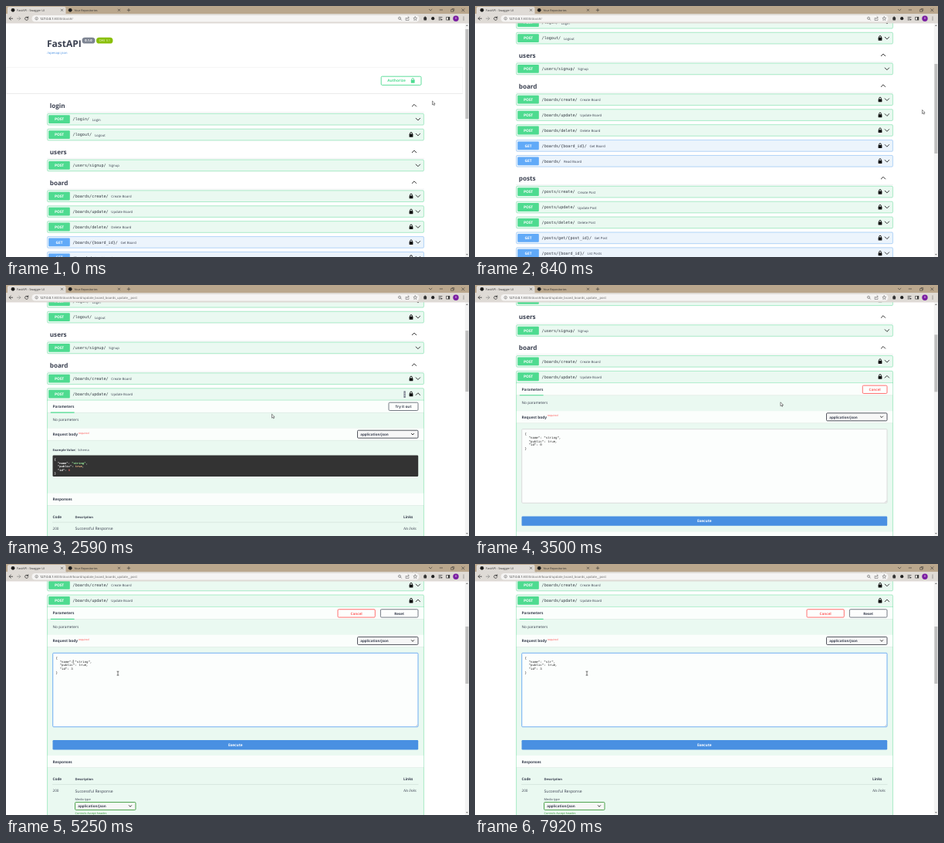
These frames come from a looping animation (600 by 325 pixels, 8000 ms). An HTML page:

```html
<!DOCTYPE html>
<html lang="en">
<head>
<meta charset="utf-8">
<title>API docs</title>
<style>
  html, body { margin: 0; width: 100%; height: 100%; overflow: hidden; background: #fff; }
  svg { display: block; width: 100vw; height: 100vh; }
  text { font-family: "Open Sans", "Noto Sans", sans-serif; white-space: pre; text-rendering: geometricPrecision; }
  .mono { font-family: "Liberation Mono", monospace; }
  .path { font-family: "DejaVu Sans Mono", monospace; }
  .b { font-weight: 700; }
  .i { font-style: italic; }
  .mid { text-anchor: middle; }
</style>
</head>
<body>
<svg id="stage" viewBox="0 0 600 325" preserveAspectRatio="none"></svg>
<script>
const LOOP = 8000, TICK = 1000 / 12, WHEEL = 31.25;
const GREEN = '#4edb90', BLUE = '#61aaf8', INK = '#3b4151', RED = '#ff6060', BAR = '#dfdbd6';
const stage = document.getElementById('stage');

function el(parent, tag, attrs = {}, text) {
  const node = document.createElementNS('http://www.w3.org/2000/svg', tag);
  for (const k in attrs) node.setAttribute(k, attrs[k]);
  if (text !== undefined) node.textContent = text;
  return parent.appendChild(node);
}
const group = parent => el(parent, 'g');
const rect = (p, x, y, width, height, fill, more) => el(p, 'rect', { x, y, width, height, fill, ...more });
const circle = (p, cx, cy, r, fill, more) => el(p, 'circle', { cx, cy, r, fill, ...more });
const line = (p, d, stroke, width = 0.8) =>
  el(p, 'path', { d, stroke, 'stroke-width': width, fill: 'none', 'stroke-linecap': 'round', 'stroke-linejoin': 'round' });
// text placed by the vertical middle of its capitals
const label = (p, x, cy, s, size, cls = '', fill = INK) =>
  el(p, 'text', { x, y: cy + size * 0.35, 'font-size': size, class: cls, fill }, s);
const show = (node, on) => node.setAttribute('display', on ? 'inline' : 'none');

function chevron(p, x, y, up, size = 2.7, color = '#222') {
  const h = up ? -size / 4 : size / 4;
  return line(p, `M${x - size} ${y - 2 * h}L${x} ${y + 2 * h}L${x + size} ${y - 2 * h}`, color, 0.9);
}
function lock(p, x, y, color) {
  rect(p, x - 2.4, y - 0.8, 4.8, 3.9, color, { rx: 0.5 });
  line(p, `M${x - 1.4} ${y - 0.6}v-1a1.4 1.4 0 0 1 2.8 0v1`, color, 0.9);
}
function button(p, x, y, w, h, s, color, textColor) {
  const g = group(p);
  rect(g, x, y, w, h, '#fff', { 'fill-opacity': 0.6, stroke: color, 'stroke-width': 0.9, rx: 1.3 });
  label(g, x + w / 2, y + h / 2, s, 4.6, 'b mid', textColor);
  return g;
}
function select(p, x, y, color) {
  rect(p, x, y, 78.5, 10, '#f7f7f7', { stroke: color, 'stroke-width': 0.9, rx: 1.2 });
  label(p, x + 3.7, y + 5.1, 'application/json', 4.5, 'b');
  chevron(p, x + 71.5, y + 5, false, 1.6);
}
function band(p, cy, s) {
  rect(p, 53.8, cy - 7.7, 487.4, 15.8, '#000', { 'fill-opacity': 0.07 });
  rect(p, 53.8, cy - 7.9, 487.4, 15.4, '#fbfefc');
  label(p, 60.5, cy, s, 4.8, 'b');
}

// ---------- page ----------
rect(stage, 0, 0, 600, 325, '#fff');
const page = group(stage);

label(page, 53, 48.3, 'FastAPI', 12, 'b');
rect(page, 98.5, 40.8, 17, 7.8, '#7d8492', { rx: 3.9 });
label(page, 107, 44.7, '0.1.0', 4.1, 'b mid', '#fff');
rect(page, 117, 40.8, 21.5, 7.8, '#89bf04', { rx: 3.9 });
label(page, 127.8, 44.7, 'OAS 3.1', 4.1, 'mid', '#fff');
label(page, 53.3, 60.6, '/openapi.json', 4.1, '', '#4990e2');
rect(page, 1, 79.5, 590.5, 34, '#fff', { stroke: '#f1f1f1', 'stroke-width': 0.6 });
line(page, 'M1 113.4H591.5', '#e2e2e2', 0.6);
button(page, 486.2, 91.2, 51.8, 11.2, '', GREEN);
label(page, 494.3, 96.8, 'Authorize', 4.8, 'b', GREEN);
lock(page, 527.2, 96.6, GREEN);

function heading(p, y, name) {
  label(p, 56.8, y + 0.2, name, 8.1, 'b');
  chevron(p, 529, y - 0.3, true);
  line(p, `M53.5 ${y + 8.6}H541.5`, '#dfe1e4', 0.4);
}
function row(p, y, method, path, title, locked) {
  const g = group(p), color = method === 'GET' ? BLUE : GREEN;
  const box = { x: 53.6, y: y - 7.3, width: 487.8, height: 14.6, rx: 1.3 };
  const shade = el(g, 'rect', { ...box, fill: 'none', stroke: '#000', 'stroke-opacity': 0.04, 'stroke-width': 1.6 });
  const back = el(g, 'rect', {
    ...box, fill: method === 'GET' ? '#ecf4fc' : '#eaf9f1', stroke: color, 'stroke-width': 0.5, 'stroke-opacity': 0.85
  });
  rect(g, 55.2, y - 5.4, 27.6, 10.8, color, { rx: 1 });
  label(g, 69, y, method, 4.8, 'b mid', '#fff');
  label(g, 86.6, y, path, 5.1, 'path', '#30353f');
  label(g, 86.6 + path.length * 3.06 + 3.8, y + 0.5, title, 4.3);
  if (locked) lock(g, 525, y, '#111');
  const down = chevron(g, 533.9, y, false), up = chevron(g, 533.9, y, true);
  show(up, false);
  return { boxes: [shade, back], down, up };
}

const api = {
  login: ['POST /login/ Login', 'POST /logout/ Logout *'],
  users: ['POST /users/signup/ Signup'],
  board: ['POST /boards/create/ Create Board *', 'POST /boards/update/ Update Board *',
    'POST /boards/delete/ Delete Board *', 'GET /boards/{board_id}/ Get Board *', 'GET /boards/ Read Board *'],
  posts: ['POST /posts/create/ Create Post *', 'POST /posts/update/ Update Post *', 'POST /posts/delete/ Delete Post *',
    'GET /posts/get/{post_id}/ Get Post *', 'GET /posts/{board_id}/ List Posts *']
};
const below = group(page);
let y = 129, layer = page, op;
for (const tag in api) {
  heading(layer, y, tag);
  y += 17.7;
  for (const spec of api[tag]) {
    const [method, path, ...words] = spec.replace(' *', '').split(' ');
    const made = row(layer, y, method, path, words.join(' '), spec.endsWith('*'));
    if (path === '/boards/update/') { op = made; layer = below; }
    y += 19.9;
  }
  y += 2.2;
}

// ---------- opened operation ----------
const panel = group(page);
line(panel, 'M53.6 274.2H541.4', GREEN, 0.5);
band(panel, 282.4, 'Parameters');
line(panel, 'M58.2 290.1H88.2', GREEN, 1.1);
label(panel, 60.5, 299.7, 'No parameters', 4.8);
band(panel, 318.4, 'Request body');
label(panel, 94, 316.6, 'required', 3.4, '', '#f44');
select(panel, 455.5, 313.2, '#41444e');

const copyIcon = group(panel);
rect(copyIcon, 515.4, 262.2, 2.4, 8.8, '#7d8492', { rx: 0.6 });
line(copyIcon, 'M516.1 265.2h1M516.1 268h1', '#fff', 0.6);

const example = group(panel);
button(example, 496, 277.2, 38, 10.3, 'Try it out', '#666b76', INK);
label(example, 60.5, 338.7, 'Example Value', 4, 'b');
line(example, 'M90.4 336.8v3.8', '#aaa', 0.3);
label(example, 93, 338.7, 'Schema', 4);
rect(example, 60.5, 345.5, 473.7, 27.4, '#333', { rx: 1.2 });
[['{'], ['  "name": ', '"string"', '#a2fca2', ','], ['  "public": ', 'true', '#fcc28c', ','], ['  "id": ', '0', '#d36363'], ['}']]
  .forEach(([key, value = '', color = '#fff', tail = ''], i) => {
    const t = label(example, 62.4, 350.7 + i * 4.5, key, 3.8, 'mono b', '#fff');
    el(t, 'tspan', { fill: color }, value);
    el(t, 'tspan', {}, tail);
  });

const editor = group(panel);
const CHAR = 2.48, LINE = 4.65;
const area = rect(editor, 60.7, 334, 473.3, 95.6, '#fcfefd', { 'stroke-width': 0.9, rx: 1 });
line(editor, 'M531.3 428.6l1.8-1.8M532.4 428.6l.7-.7', '#888', 0.3);
const codeLines = [0, 1, 2, 3, 4].map(i => label(editor, 64.5, 340.4 + i * LINE, '', 4.13, 'mono', '#222'));
const carets = [0, 1].map(() => rect(editor, 0, 0, 0.6, 4.4, '#222'));
const cancelWide = button(editor, 502.3, 277.5, 31.7, 10.3, 'Cancel', RED, RED);
const editButtons = group(editor);
button(editButtons, 430, 277.5, 48.3, 10.3, 'Cancel', RED, RED);
button(editButtons, 485.4, 277.5, 48.6, 10.3, 'Reset', '#666b76', INK);
rect(editor, 60.5, 446.8, 473.7, 12.4, '#4990e2', { rx: 1.2 });
label(editor, 297.3, 453, 'Execute', 4.8, 'b mid', '#fff');

const answers = group(panel);
band(answers, 402.6, 'Responses');
label(answers, 60.5, 425.6, 'Code', 4.7, 'b');
label(answers, 89.5, 425.6, 'Description', 4.1, 'b');
label(answers, 515, 425.6, 'Links', 4.7, 'b');
line(answers, 'M60.5 432.2H534', '#bccbc6', 0.4);
label(answers, 60.5, 440.4, '200', 4.6);
label(answers, 89.5, 440.6, 'Successful Response', 5.1);
label(answers, 515.2, 440.4, 'No links', 4.7, 'i');
label(answers, 89.5, 451.6, 'Media type', 3.9);
select(answers, 89.5, 455.2, '#3c9a3c');
label(answers, 89.5, 469.3, 'Controls Accept header.', 3.75, '', '#2f8f2f');

// ---------- scrollbar and browser frame ----------
rect(stage, 594.8, 22, 5.2, 303, '#f3f3f3');
const thumb = rect(stage, 595.4, 30, 4, 116, '#bfbfbf');
el(stage, 'path', { d: 'M596 26l1.4-1.7 1.4 1.7zM596 321l1.4 1.7 1.4-1.7z', fill: '#777' });

const frame = group(stage);
rect(frame, 0, 0, 600, 10.5, '#baa78d');
rect(frame, 2, 1, 75.5, 12, BAR, { rx: 2 });
rect(frame, 0, 10.3, 600, 11.9, BAR);
line(frame, 'M0 22.2H600', '#d3cfca', 0.4);
circle(frame, 9, 5.3, 2.4, '#1c1c1c');
label(frame, 14, 5.3, 'FastAPI - Swagger UI', 3.8, '', '#333');
circle(frame, 83.2, 5.3, 2.4, '#1c1c1c');
label(frame, 88.4, 5.3, 'Your Repositories', 3.7, '', '#333');
const cross = (x, r) => line(frame, `M${x - r} ${5.3 - r}l${2 * r} ${2 * r}m0 ${-2 * r}l${-2 * r} ${2 * r}`, '#333', 0.6);
cross(72.5, 1.2);
cross(146.5, 1.2);
cross(592.3, 1.6);
line(frame, 'M157.2 5.3h3.6M159 3.5v3.6M562.2 5h3.4M548.3 4.3l1.8 1.7 1.8-1.7', '#333', 0.6);
line(frame, 'M577 4.6h2.7v2.7h-2.7zM578 4.4v-.9h2.7v2.7h-.9', '#333', 0.5);
line(frame, 'M8.6 16.2H4.2M6.2 14.2l-2 2 2 2', '#333', 0.8);
line(frame, 'M14.4 16.2h4.4M16.8 14.2l2 2-2 2', '#888', 0.7);
line(frame, 'M28.5 15.2a2.1 2.1 0 1 0 .2 1.8M28.7 13.8v1.6h-1.6', '#333', 0.8);
rect(frame, 33.5, 11.9, 502, 8.7, '#f5f4f3', { rx: 4.3 });
circle(frame, 39.6, 16.2, 1.8, 'none', { stroke: '#555', 'stroke-width': 0.5 });
line(frame, 'M39.6 16v1', '#555', 0.5);
const address = label(frame, 44, 16.3, '127.0.0.1', 4.15, '', '#222');
const route = el(address, 'tspan', { fill: '#666' });
circle(frame, 510, 15.8, 1.5, 'none', { stroke: '#555', 'stroke-width': 0.6 });
line(frame, 'M511.2 17l1.3 1.3', '#555', 0.6);
line(frame, 'M519 15.5h-1v3h4v-1.6M519.3 16.8q.3-2 2.6-2M521 13.6l1.3 1.2-1.3 1.2', '#555', 0.5);
line(frame, 'M530.3 13.8l.7 1.6 1.7.2-1.3 1.2.4 1.7-1.5-.9-1.5.9.4-1.7-1.3-1.2 1.7-.2z', '#555', 0.5);
rect(frame, 541.3, 14.6, 3.8, 3.8, '#333', { rx: 0.7 });
circle(frame, 543.2, 14.3, 0.9, '#333');
circle(frame, 553.2, 16.2, 2.1, '#222');
line(frame, 'M561 14.6h4M561 16.3h2.2M561 18h2', '#333', 0.7);
circle(frame, 564.5, 17.6, 0.9, '#333');
rect(frame, 570.7, 14.3, 4.2, 3.8, 'none', { stroke: '#333', 'stroke-width': 0.6 });
rect(frame, 573, 14.3, 1.9, 3.8, '#333');
circle(frame, 583, 16.2, 3.7, '#7b1fa2');
label(frame, 583, 16.2, 'H', 3.6, 'mid', '#fff');
[14.3, 16.2, 18.1].forEach(cy => circle(frame, 593, cy, 0.5, '#444'));

const arrow = el(stage, 'path', {
  d: 'M0 0V5L1.2 3.9 2 5.7 2.9 5.3 2.1 3.6H3.7Z', fill: '#fff', stroke: '#222', 'stroke-width': 0.5
});
const beam = line(stage, 'M-1 -2.4h.8l.2.2.2-.2h.8M0-2.2v4.6M-1 2.5h2', '#222', 0.6);

// ---------- timeline ----------
const OPEN = 2160, TRY = 3320, FOCUS = 3830, FIRST_EDIT = 4240;
const wheels = [340, 390, 455, 640, 3430, 3500, 3570];
const moves = [
  [83, 552.5, 123], [250, 579.5, 134.5], [1080, 579.5, 134.5], [1416, 548.5, 146.5],
  [2000, 362, 141], [2330, 350, 142], [2583, 344.5, 167.2], [2840, 508.5, 156], [3083, 512, 156.5],
  [3350, 512, 156.5], [3750, 145, 141.5]
];
// time, name, id, caret line, caret column
const edits = [
  [FOCUS, 'string', '0', 4, 1], [3995, 'string', '0', 3, 9], [FIRST_EDIT, 'string', '', 3, 8],
  [4580, 'string', '3', 3, 9], [4920, 'string', '3', 2, 9], [5080, 'string', '3', 1, 9],
  [5400, 'string', '3', 1, 19], [5900, 'string', '3', 1, 18], [6600, 'string', '3', 1, 17],
  [6830, 'strin', '3', 1, 16], [7080, 'stri', '3', 1, 15], [7350, 'str', '3', 1, 14]
];

function scrollAt(t) {
  return wheels.reduce((sum, start) => {
    const u = Math.min(1, Math.max(0, (t - start) / 150));
    return sum + WHEEL * u * (2 - u);
  }, 0);
}
function pointerAt(t) {
  let from = moves[0];
  for (const to of moves) {
    if (t < to[0]) {
      const u = Math.max(0, (t - from[0]) / (to[0] - from[0] || 1));
      const e = u * u * (3 - 2 * u);
      return [from[1] + (to[1] - from[1]) * e, from[2] + (to[2] - from[2]) * e];
    }
    from = to;
  }
  return [from[1], from[2]];
}
function placeCaret(node, edit, on) {
  show(node, on);
  node.setAttribute('x', 64.5 + edit[4] * CHAR);
  node.setAttribute('y', 338.2 + edit[3] * LINE);
}

function draw(time) {
  const t = Math.floor((time + 5) / TICK) * TICK;
  const opened = t >= OPEN, trying = t >= TRY, focused = t >= FOCUS;
  const scroll = scrollAt(t);

  page.setAttribute('transform', `translate(0 ${-scroll})`);
  show(below, !opened);
  show(panel, opened);
  show(op.down, !opened);
  show(op.up, opened);
  op.boxes.forEach(box => box.setAttribute('height', opened ? 440 : 14.6));
  show(copyIcon, t < 2840);
  show(example, !trying);
  show(editor, trying);
  answers.setAttribute('transform', `translate(0 ${trying ? 72 : 0})`);
  thumb.setAttribute('y', 30 + scroll * (opened ? 0.233 : 0.36));
  thumb.setAttribute('height', trying ? 74 : opened ? 79 : 116);
  route.textContent = ':8000/docs#/' + (opened ? 'board/update_board_boards_update__post' : '');

  const now = edits.reduce((last, e, i) => (t >= e[0] ? i : last), 0);
  const edit = edits[now], [start, name, id] = edit;
  ['{', `  "name": "${name}",`, '  "public": true,', `  "id": ${id}`, '}']
    .forEach((s, i) => { codeLines[i].textContent = s; });
  area.setAttribute('stroke', focused ? '#61a5f2' : '#d9d9d9');
  placeCaret(carets[0], edit, focused && (t - start) % 1060 < 530);
  placeCaret(carets[1], edits[0], now === 1 && t - start < 80);
  show(cancelWide, t < FIRST_EDIT);
  show(editButtons, t >= FIRST_EDIT);

  const [px, py] = pointerAt(t);
  const inArea = trying && px < 534 && py + scroll > 334 && py + scroll < 429;
  show(arrow, !inArea);
  show(beam, inArea);
  (inArea ? beam : arrow).setAttribute('transform', `translate(${px} ${py})`);
}

const begin = performance.now();
function tick() {
  draw((performance.now() - begin) % LOOP);
  requestAnimationFrame(tick);
}
tick();
</script>
</body>
</html>
```
